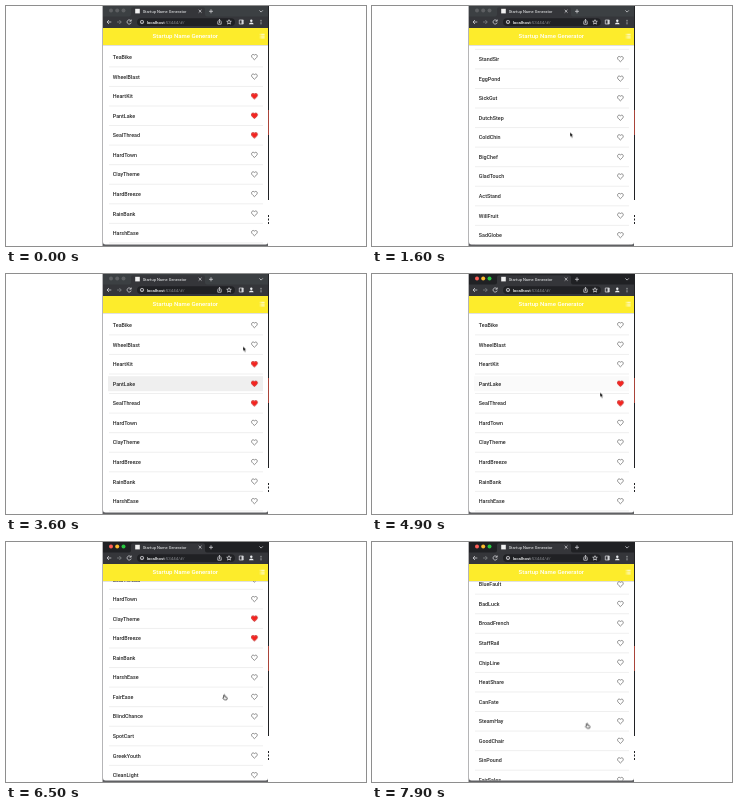
Recreate the animation shown at these times as an HTML page. Size 360 by 240 pixels, loop 8 s.

```html
<!DOCTYPE html>
<html lang="en">
<head>
<meta charset="utf-8">
<title>Startup Name Generator</title>
<style>
html, body { margin: 0; width: 100%; height: 100%; overflow: hidden; background: #fff; }
svg { display: block; width: 100%; height: 100%; }
text { font-family: Roboto, Arial, sans-serif; }
.name { font-size: 5.35px; font-weight: 500; fill: #2a2a2a; }
.outline { fill: none; stroke: #555; stroke-width: 2.3; }
.fav { fill: #f4231f; }
.icon { fill: none; stroke: #d8d9dc; stroke-width: .75; }

/* Every animation is paused; --t moves the playhead in 100 ms steps. */
.anim { animation: 8s linear var(--t, 0s) infinite paused; }
.step { animation-timing-function: step-end; }

#rows { animation-name: scroll; }
@keyframes scroll {
  0%, 5% { transform: translateY(0); animation-timing-function: ease-in-out; }
  17.5%, 21.25% { transform: translateY(-623.9px); animation-timing-function: ease-in-out; }
  28.75%, 76.25% { transform: translateY(0); animation-timing-function: ease-in; }
  81.25% { transform: translateY(-91.8px); animation-timing-function: ease-out; }
  98.75%, 100% { transform: translateY(-360.8px); }
}
#cursor { animation-name: move; }
@keyframes move {
  0%, 5% { transform: translate(190px, 138px); }
  20% { transform: translate(198px, 126.3px); }
  30% { transform: translate(209px, 110.3px); }
  37% { transform: translate(214px, 108px); }
  45% { transform: translate(237px, 72.5px); }
  52%, 54% { transform: translate(248px, 90px); }
  61.25% { transform: translate(228px, 118.5px); }
  65%, 66% { transform: translate(248px, 110px); }
  68%, 69% { transform: translate(248px, 129px); }
  71%, 72% { transform: translate(248px, 168px); }
  74%, 75% { transform: translate(248px, 188px); }
  81.25% { transform: translate(218px, 152.7px); }
  98.75%, 100% { transform: translate(214.7px, 181.3px); }
}
#arrow { animation-name: arrow; }
@keyframes arrow { 0% { opacity: 0; } 5% { opacity: 1; } 63.75%, 100% { opacity: 0; } }
#hand { animation-name: hand; }
@keyframes hand { 0% { opacity: 0; } 63.75%, 100% { opacity: 1; } }
#hover { animation-name: hover; }
@keyframes hover {
  0% { opacity: 0; } 32.5% { opacity: 1; } 47.5% { opacity: 0; }
  60% { opacity: .3; } 67.5%, 100% { opacity: 0; }
}
#active { animation-name: focus; }
@keyframes focus { 0% { opacity: 0; } 53.75%, 100% { opacity: 1; } }

.HeartKit { animation-name: heartkit; }
.PantLake { animation-name: pantlake; }
.SealThread { animation-name: sealthread; }
.ClayTheme { animation-name: claytheme; }
.HardBreeze { animation-name: hardbreeze; }
@keyframes heartkit { 0% { opacity: 1; } 53.75%, 100% { opacity: 0; } }
@keyframes pantlake { 0% { opacity: 1; } 66.25%, 100% { opacity: 0; } }
@keyframes sealthread { 0% { opacity: 1; } 68.75%, 100% { opacity: 0; } }
@keyframes claytheme { 0% { opacity: 0; } 71.25%, 100% { opacity: 1; } }
@keyframes hardbreeze { 0% { opacity: 0; } 75%, 100% { opacity: 1; } }
</style>
</head>
<body>
<svg viewBox="0 0 360 240">
  <defs>
    <path id="heart" d="M12 21.35l-1.45-1.32C5.4 15.36 2 12.28 2 8.5 2 5.42 4.42 3 7.5 3c1.74 0 3.41.81 4.5 2.09C13.09 3.81 14.76 3 16.5 3 19.58 3 22 5.42 22 8.5c0 3.78-3.4 6.86-8.55 11.54z"/>
    <clipPath id="page"><path d="M97 39H262V236Q262 238.5 259.5 238.5H99.5Q97 238.5 97 236Z"/></clipPath>
    <linearGradient id="shade" x2="0" y2="1">
      <stop stop-color="#777" stop-opacity=".35"/>
      <stop offset="1" stop-color="#777" stop-opacity="0"/>
    </linearGradient>
  </defs>

  <!-- Desktop edges around the window -->
  <path d="M96 0H97V240H96Z" fill="#b5b5b7"/>
  <path d="M262 0H263V194H262Z" fill="#202124"/>
  <path d="M262 104H263V129H262Z" fill="#a8443a"/>
  <path d="M262.5 209V218" stroke="#202124" stroke-dasharray="2 1.5"/>
  <path d="M97 236H262V240H97Z" fill="#606164"/>

  <!-- List -->
  <g clip-path="url(#page)">
    <path d="M97 39H262V239H97Z" fill="#fff"/>
    <g id="rows" class="anim">
      <rect id="hover" class="anim step" x="102" y="102.2" width="155" height="15" fill="#efefef"/>
    </g>
  </g>

  <!-- App bar -->
  <path d="M97 39H262V40.5H97Z" fill="url(#shade)"/>
  <path d="M97 21H262V39H97Z" fill="#fdec2b"/>
  <text x="179.3" y="32.4" font-size="6" font-weight="500" text-anchor="middle" fill="#fff">Startup Name Generator</text>
  <path d="M255.2 28.3H258.6M255.2 30.1H258.6M255.2 31.9H258.6M253.8 28.3h.7M253.8 30.1h.7M253.8 31.9h.7" stroke="#fff" stroke-width=".8"/>

  <!-- Browser frame -->
  <path d="M97 0H262V11H97Z" fill="#3c4043"/>
  <g fill="#5d5f62">
    <circle cx="105" cy="4.4" r="2"/><circle cx="111.2" cy="4.4" r="2"/><circle cx="117.5" cy="4.4" r="2"/>
  </g>
  <g id="active" class="anim step">
    <path d="M97 0H262V11H97Z" fill="#202124"/>
    <circle cx="105" cy="4.4" r="2" fill="#fe5f57"/>
    <circle cx="111.2" cy="4.4" r="2" fill="#febc2e"/>
    <circle cx="117.5" cy="4.4" r="2" fill="#28c840"/>
  </g>
  <path d="M123 10.5Q125 10.5 125 8.5V3.2Q125 1.2 127 1.2H197Q199 1.2 199 3.2V8.5Q199 10.5 201 10.5H262V22H97V10.5Z" fill="#35363a"/>
  <rect x="129.2" y="2.8" width="4.6" height="4.6" fill="#f1f1f1"/>
  <text x="136.7" y="6.7" font-size="4.05" fill="#f1f3f4">Startup Name Generator</text>
  <g class="icon">
    <path d="M192.7 3.8l2.8 2.8m0-2.8l-2.8 2.8M205 3.3V7.3M203 5.3H207M253.4 4.4l1.7 1.7 1.7-1.7"/>
    <path d="M105.3 16H101.2M103 14l-2 2 2 2"/>
    <path d="M111 16H115.1M113.3 14l2 2-2 2" stroke="#85878a"/>
    <path d="M125 14.9a2.1 2.1 0 1 0 .2 1.7M125.2 13.5V15.2H123.5"/>
  </g>
  <rect x="131" y="12.2" width="98" height="7.8" rx="3.9" fill="#202124"/>
  <g class="icon">
    <circle cx="136" cy="16" r="1.7"/><path d="M136 15.6V17"/>
    <path d="M212.3 15.4H211.8V18.2H215.2V15.4H214.7M213.5 17V13.4M212.3 14.6l1.2-1.2 1.2 1.2"/>
    <path d="M223 13.7l.6 1.5 1.7.1-1.3 1.1.4 1.7-1.4-.9-1.4.9.4-1.7-1.3-1.1 1.7-.1z"/>
    <path d="M233.3 14H237.3V18H233.3Z"/><path d="M236.3 14V18" stroke-width="1.5"/>
  </g>
  <text x="140.7" y="17.6" font-size="4.4" font-weight="500" fill="#f1f3f4">localhost<tspan font-weight="400" fill="#888b90">:53444/#/</tspan></text>
  <g fill="#eceef0">
    <circle cx="245.3" cy="14.8" r="1.2"/>
    <path d="M243 18.3Q243 16.5 245.3 16.5T247.6 18.3Z"/>
    <circle cx="255" cy="14.2" r=".5"/><circle cx="255" cy="16" r=".5"/><circle cx="255" cy="17.8" r=".5"/>
  </g>

  <!-- Pointer -->
  <g id="cursor" class="anim" stroke="#fff" stroke-width=".4" stroke-linejoin="round">
    <path id="arrow" class="anim step" fill="#000" d="M0 0V4.5L1.1 3.6 1.9 5.4 2.8 5 2 3.3H3.4Z"/>
    <path id="hand" class="anim step" fill="#fff" stroke="#111" stroke-width=".7" d="M-.3.4Q.3-.4.9.4V2L2.7 2.4Q3.4 2.7 3.2 3.5L2.7 5H.3L-1.2 3.3Q-1.2 2.5-.3 2.9Z"/>
  </g>
</svg>
<script>
const names = `TeaBike WheelBlast HeartKit PantLake SealThread HardTown ClayTheme HardBreeze
RainBank HarshEase FairEase BlindChance SpotCart GreekYouth CleanLight MildStone DeskTrail
WarmCloth BlueFault BadLuck BroadFrench StaffRail ChipLine HeatShare CanFate SteamHay
GoodChair SinPound FairSales NorthCup PlainRoof TallGrain StandSir EggPond SickGut DutchStep
ColdChin BigChef GladTouch ActStand WillFruit SadGlobe LongShelf`.split(/\s+/);
const liked = ["HeartKit", "PantLake", "SealThread", "ClayTheme", "HardBreeze"];
const pitch = 19.56;

const rowMarkup = (name, i) => {
  const y = 51.1 + i * pitch;
  const heart = (cls, k) =>
    `<use href="#heart" class="${cls}" transform="translate(248.4 ${y}) scale(${k}) translate(-12 -12.2)"/>`;
  return `<text class="name" x="106.8" y="${y + 2}">${name}</text>
    <path d="M103 ${y + pitch / 2}H257" stroke="#dedede" stroke-width=".5"/>
    ${heart("outline", .285)}
    ${liked.includes(name) ? heart(`fav anim step ${name}`, .32) : ""}`;
};
document.getElementById("rows").insertAdjacentHTML("beforeend", names.map(rowMarkup).join(""));

const start = performance.now();
function tick(now) {
  const t = Math.floor(Math.max(0, now - start) % 8000 / 100) * 100;
  document.documentElement.style.setProperty("--t", `${-t}ms`);
  requestAnimationFrame(tick);
}
requestAnimationFrame(tick);
</script>
</body>
</html>
```
